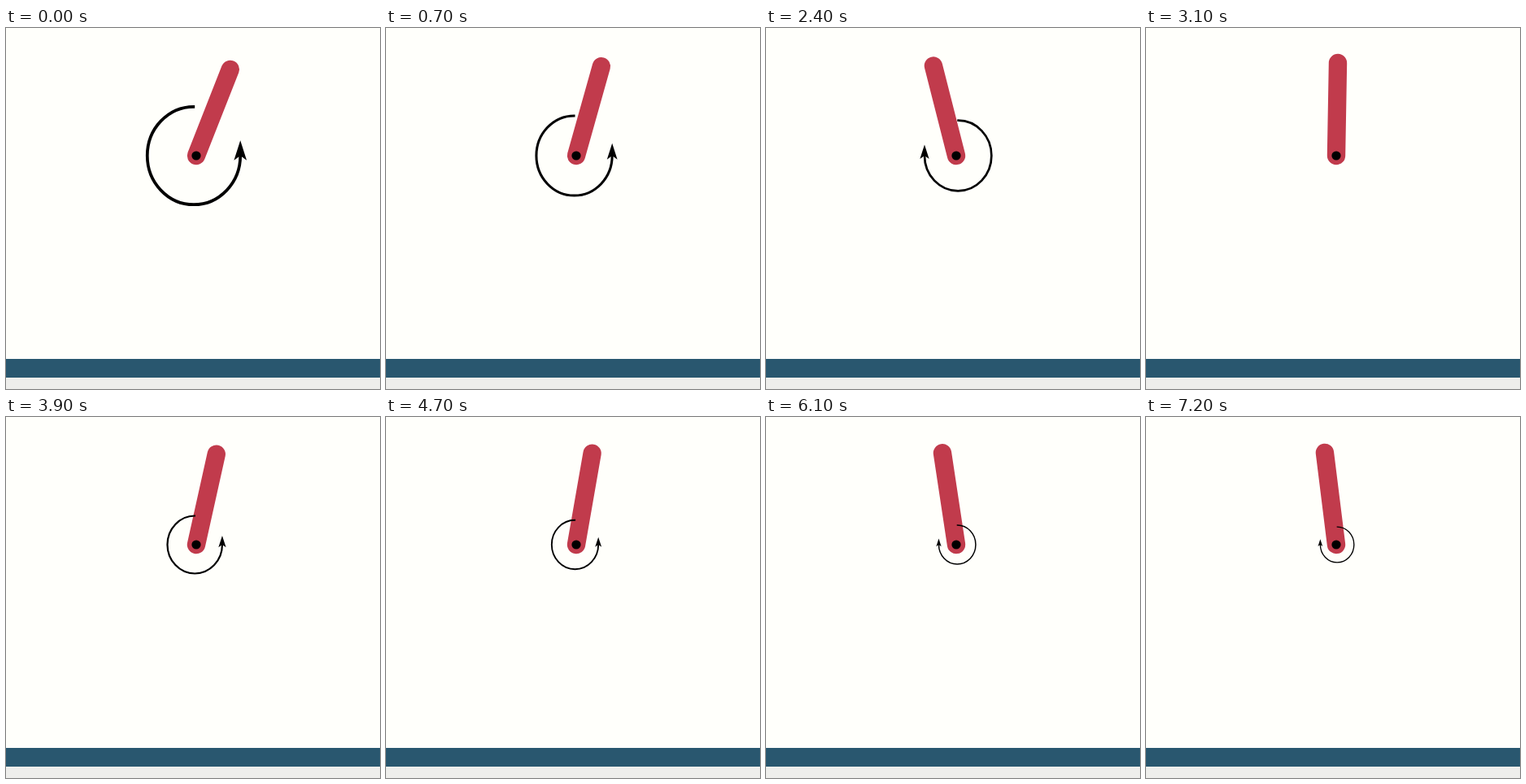
These frames come from a looping animation (460x444 px, 7.3 s). An HTML page:

```html
<!DOCTYPE html>
<html lang="en">
<head>
<meta charset="utf-8">
<title>Balancing rod</title>
<style>
  html, body { margin: 0; width: 100%; height: 100%; overflow: hidden; background: #fffffb; }
  svg { display: block; width: 460px; height: 444px; }
</style>
</head>
<body>
<svg viewBox="0 0 460 444">
  <rect width="460" height="444" fill="#fffffb"/>
  <rect y="407" width="460" height="23" fill="#29576f"/>
  <rect y="430" width="460" height="14" fill="#eeeeec"/>
  <g transform="translate(234 157)">
    <line id="rod" y2="-114" stroke="#c13b4c" stroke-width="22.4" stroke-linecap="round"/>
    <circle r="5.6"/>
    <!-- unit-sized turn arrow, scaled by the torque -->
    <g id="arrow">
      <path d="M-.03-1H-.05A.95 1 0 1 0 .9 0" fill="none" stroke="#000" stroke-width=".062"/>
      <path d="M.9-.31L1.03.095L.9 0L.77.095Z"/>
    </g>
  </g>
</svg>
<script>
const LOOP = 7300, STEP = 100;
const LAG = 45;    // the torque trails the tilt, ms
const GAIN = 2.9;  // arrow radius per degree of tilt

// time (ms), tilt (deg), rate (deg/s)
const keys = [
  [0, 21.5, 14.2], [220, 22.9, 0], [700, 15.7, -28.4],
  [1700, -14.5, -15.6], [2050, -17.3, 0], [3100, 1, 22],
  [4150, 13.3, 0], [4700, 9.9, -11.8], [6100, -8.6, -7.5],
  [6564, -10.4, 0], [7200, -7.1, 9.8]
];

const rod = document.getElementById("rod");
const arrow = document.getElementById("arrow");

// cubic Hermite curve through the keys
function tilt(t) {
  let i = 0;
  while (i < keys.length - 2 && t >= keys[i + 1][0]) i++;
  const [t0, a, va] = keys[i], [t1, b, vb] = keys[i + 1];
  const span = (t1 - t0) / 1000, u = (t - t0) / (t1 - t0), w = 1 - u;
  return w * w * (1 + 2 * u) * a + u * u * (3 - 2 * u) * b
    + u * w * span * (w * va - u * vb);
}

function draw(ms) {
  const t = Math.floor(ms % LOOP / STEP) * STEP;
  const r = GAIN * tilt(t - LAG);
  rod.setAttribute("transform", `rotate(${tilt(t)})`);
  arrow.setAttribute("transform", `scale(${r} ${Math.abs(r)})`);
}

const start = performance.now();
function tick() {
  draw(performance.now() - start);
  requestAnimationFrame(tick);
}
draw(0);
requestAnimationFrame(tick);
</script>
</body>
</html>
```
